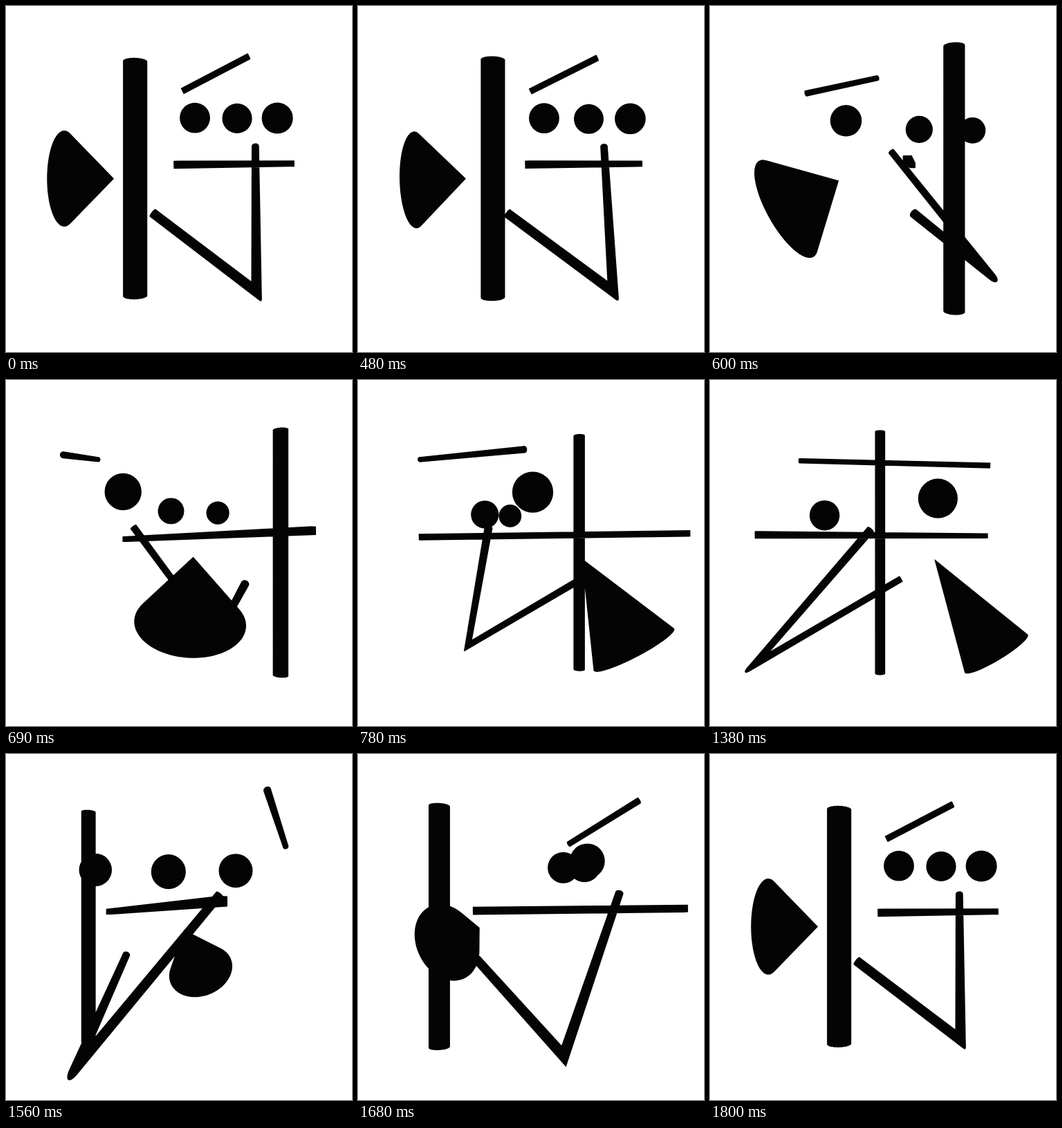
Recreate the animation shown at these times as an HTML page. Size 500 by 500 pixels, loop 1830 ms.

```html
<!DOCTYPE html>
<html lang="en">
<head>
<meta charset="utf-8">
<title>Turning strokes</title>
<style>
  html, body { margin: 0; width: 100%; height: 100%; overflow: hidden; background: #fff; }
  svg { display: block; width: 100vw; height: 100vh; }
  path { fill: #040404; }
</style>
</head>
<body>
<svg viewBox="0 0 500 500"><path id="ink"/></svg>
<script>
const LOOP = 1830, STEP = 30, STEPS = 15, GO = 480, BACK = 1380;
const EYE = 600, CX = 250, CY = 249.4;

// Solid parts in space (x right, y up, z to the viewer), each given for both signs.
// The second sign is read from behind, after half a turn.
const pillar = { at: [[-48, 0, 145], [0, 0, 146]], size: [[26.5, 257], [18.2, 437]] };
const slash = { a: [[6, 158, -150], [-110, 92.4, -160]], b: [[123, 215, -130], [102, 106, -110]], width: [11.5, 6] };
const beam = { a: [[-3.7, 18.3, 50], [-218, 33.5, 225]], b: [[197, 26, -125], [173, 24, -30]], width: [10.6, 10] };
const hook = {
  top: [[125, 53, -80], [17, 30, -48]],
  tip: [[89.6, -131, 120], [205, -180, 70]],
  low: [[-33, -43, 80], [-34, -44, 95]],
  width: [12, 11.2]
};
const cone = { apex: [[-93, 0, 6], [-75, -9.5, 4]], base: [[-163, 0, 0], [-157, -143, -25]], radius: [69, 51] };
const balls = [
  { at: [[26.2, 100, -84], [-67.5, 68, -78]], r: 25 },
  { at: [[84, 87, 0], [84, 53, 0]], r: 21.6 },
  { at: [[126, 77.5, 68], [96, 62, 100]], r: 20 }
];

const add = (a, b, s = 1) => a.map((v, i) => v + b[i] * s);
const dot = (a, b) => a.reduce((s, v, i) => s + v * b[i], 0);
const unit = a => a.map(v => v / (Math.hypot(...a) || 1));
const cross = (a, b) => [a[1] * b[2] - a[2] * b[1], a[2] * b[0] - a[0] * b[2], a[0] * b[1] - a[1] * b[0]];
const mix = ([a, b], m) => a + (b - a) * m;
const ease = p => p * p * (3 - 2 * p);

function project([x, y, z]) {
  const k = EYE / (EYE - z);
  return [CX + x * k, CY - y * k, k];
}

// Points around a centre, square to an axis.
function ring(centre, axis, r, n = 40, phase = 0) {
  const dir = unit(axis);
  const u = unit(cross(dir, Math.abs(dir[1]) > 0.9 ? [0, 0, 1] : [0, 1, 0])), v = cross(dir, u);
  return Array.from({ length: n }, (_, i) => {
    const a = phase + i / n * 2 * Math.PI;
    return add(add(centre, u, r * Math.cos(a)), v, r * Math.sin(a));
  });
}

// Outline of a convex solid as seen by the viewer.
function outline(points) {
  const pts = points.map(project).sort((p, q) => p[0] - q[0] || p[1] - q[1]);
  const half = list => {
    const out = [];
    for (const p of list) {
      while (out.length > 1) {
        const [a, b] = out.slice(-2);
        if ((b[0] - a[0]) * (p[1] - a[1]) - (b[1] - a[1]) * (p[0] - a[0]) > 0) break;
        out.pop();
      }
      out.push(p);
    }
    return out.slice(0, -1);
  };
  const hull = [...half(pts), ...half(pts.reverse())];
  return 'M' + hull.map(p => p[0].toFixed(2) + ' ' + p[1].toFixed(2)).join('L') + 'Z';
}

function rod(a, b, r, sides, phase) {
  const axis = add(b, a, -1);
  return outline([...ring(a, axis, r, sides, phase), ...ring(b, axis, r, sides, phase)]);
}

// Rod from an end to a corner, cut along the corner's mitre plane.
function limb(end, corner, other, r) {
  const dir = unit(add(corner, end, -1));
  const normal = add(dir, unit(add(corner, other, -1)), -1);
  const rim = ring(end, dir, r);
  const cut = rim.map(p => add(p, dir, dot(add(corner, p, -1), normal) / dot(dir, normal)));
  return outline([...rim, ...cut]);
}

function ball(centre, radius) {
  const [x, y, k] = project(centre), r = radius * k;
  return `M${x - r} ${y}a${r} ${r} 0 1 1 ${2 * r} 0a${r} ${r} 0 1 1 ${-2 * r} 0Z`;
}

function scene(angle, m) {
  const c = Math.cos(angle), s = Math.sin(angle);
  const place = ([from, to]) => {
    const [x, y, z] = add(from, add(to, from, -1), m);
    return [x * c + z * s, y, z * c - x * s];
  };

  const [width, height] = [0, 1].map(i => mix(pillar.size.map(v => v[i]), m));
  const foot = place(pillar.at), up = [0, height / 2, 0];
  const top = place(hook.top), tip = place(hook.tip), low = place(hook.low);
  const thick = mix(hook.width, m) / 2;
  const apex = place(cone.apex), base = place(cone.base);

  return [
    rod(add(foot, up, -1), add(foot, up), width / 2),
    rod(place(slash.a), place(slash.b), mix(slash.width, m) / 2),
    rod(place(beam.a), place(beam.b), mix(beam.width, m) * Math.SQRT1_2, 4, Math.PI / 4),
    limb(top, tip, low, thick),
    limb(low, tip, top, thick),
    outline([apex, ...ring(base, add(base, apex, -1), mix(cone.radius, m), 72)]),
    ...balls.map(b => ball(place(b.at), b.r))
  ].join('');
}

const ink = document.getElementById('ink');
const turn = (t, start) => t < start ? 0 : ease(Math.min(1, (Math.floor((t - start) / STEP) + 1) / STEPS));

function draw(now) {
  const t = now % LOOP, go = turn(t, GO), back = turn(t, BACK);
  ink.setAttribute('d', scene(Math.PI * (go + back), go - back));
}

const start = performance.now();
function tick() {
  draw(performance.now() - start);
  requestAnimationFrame(tick);
}
tick();
</script>
</body>
</html>
```
